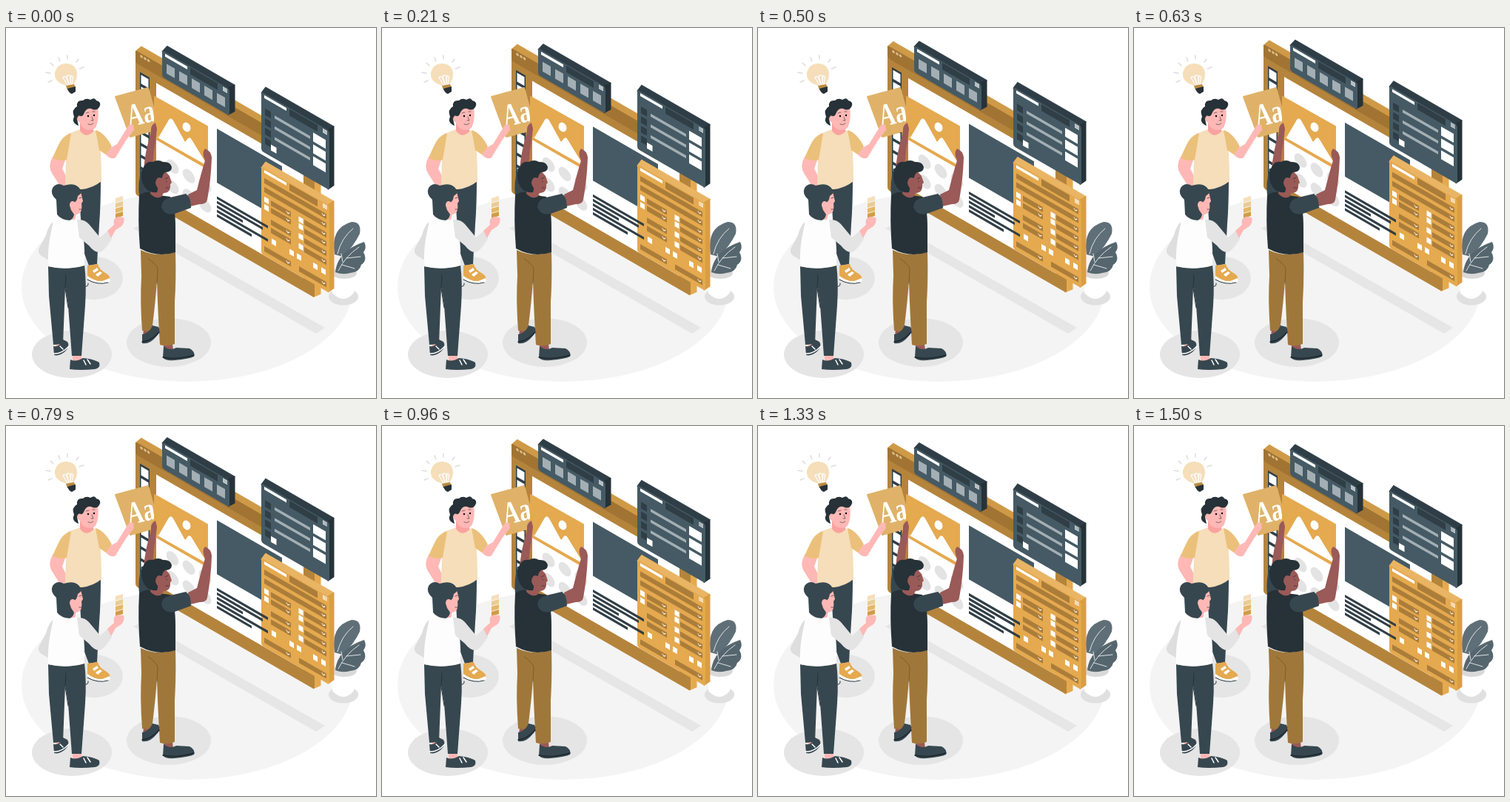
Write an HTML page that moves like this. It is 500 px wide and 500 px high and loops after 1.54 s.

```html
<!DOCTYPE html>
<html lang="en">
<meta charset="utf-8">
<title>Building a page together</title>
<style>
html, body { margin: 0; width: 100%; height: 100%; overflow: hidden; background: #fff }
svg { display: block; width: 100%; height: 100% }
.dark { fill: #263238 } .slate { fill: #37474f } .pink { fill: #ffb8b5 } .brown { fill: #9a5a57 }
.line { fill: none; stroke-linecap: round; stroke-linejoin: round }
</style>
<svg viewBox="0 0 500 500">
  <ellipse cx="245" cy="350" rx="224" ry="128" fill="#f4f4f4"/>
  <path d="M172 271L184 264 431 405 419 413Z" fill="#e6e6e6"/>
  <g fill="#e5e5e5">
    <ellipse cx="119" cy="338" rx="39" ry="29"/>
    <ellipse cx="220" cy="425" rx="57" ry="33"/>
    <ellipse cx="89" cy="441" rx="54" ry="32"/>
  </g>

  <g id="plant">
    <ellipse cx="456" cy="363" rx="20" ry="11.5" fill="#e0e0e0"/>
    <path d="M439 331L441 358Q456 374 470 358L474 331Z" fill="#fff"/>
    <ellipse cx="457" cy="331" rx="17" ry="8" fill="#d9d9d9"/>
    <path d="M444 306Q438 270 467 262Q481 262 478 278Q470 295 455 309Z" fill="#5f6f77"/>
    <path d="M445 330Q448 301 484 289Q488 297 483 303Q489 314 480 320Q478 330 465 331Q455 334 445 330Z" fill="#56666e"/>
    <path d="M448 305Q453 284 469 271M449 328Q459 308 477 296M455 316L453 305M460 311L479 309M454 320L471 325" class="line" stroke="#dfe4e6"/>
  </g>

  <g id="board"></g>

  <g id="bulb">
    <path d="M71 40L73 45M83 37V42M98 42L95 46M105 53L99 55M60 47L64 51M54 60L60 61M57 73L62 71" class="line" stroke="#ddd" stroke-width="1.5"/>
    <path d="M80 77Q65 73 66 61Q69 48 82 48Q95 49 96 62Q96 71 91 76L80 78Z" fill="#f5deb9"/>
    <path d="M83 77L77 67Q80 64 82 68L85 76 82 65Q86 62 87 67L87 76 88 64Q92 65 90 70L89 76" class="line" stroke="#fff" stroke-width="1.2"/>
    <path d="M81 78L92 76 94 81 83 84Z" fill="#b98a42"/>
    <path d="M83 82L94 79 94 86 89 89Q85 88 83 82Z" class="dark"/>
  </g>

  <g id="card">
    <path d="M148 93L192 81 207 136 168 147Z" fill="#e0b269" stroke="#e0b269" stroke-width="2" stroke-linejoin="round"/>
    <text transform="matrix(.7 -.17 .18 1 166 134)" font-family="'Liberation Serif',serif" font-weight="700" font-size="43" fill="#fff">Aa</text>
  </g>

  <g id="picture">
    <path d="M201 93L272 133V190L201 149Z" fill="#e5a94f" stroke="#e5a94f" stroke-width="2" stroke-linejoin="round"/>
    <path d="M206 148L220 124Q223 120 226 125L242 154 246 149Q249 147 251 151L270 182V185L203 147Z" fill="#fff"/>
    <ellipse cx="244" cy="134" rx="5.2" ry="6.6" transform="rotate(-25 244 134)" fill="#fff"/>
  </g>

  <g id="presenter">
    <path d="M63 174Q56 187 62 196L77 220 86 210 76 190 81 176Z" class="pink"/>
    <path d="M98 214L128 206Q128 240 126 265L123 319 112 321 104 300Z" class="slate"/>
    <path d="M110 321L124 319Q126 327 136 332Q143 337 139 343L122 345 110 337Z" fill="#e5a94f"/>
    <path d="M110 335Q121 343 130 342L140 338Q142 343 137 345Q124 348 110 339ZM117 328L123 324 125 327 119 331ZM121 333L127 329 130 331 124 336Z" fill="#fff"/>
    <path d="M110 340Q124 348 138 344M106 349Q112 350 111 345" class="line" stroke="#263238"/>
    <path d="M84 143L100 137 118 138 126 141Q129 175 129 207Q118 216 103 218L80 217Q80 180 84 143Z" fill="#f5deb9"/>
    <path d="M88 142Q76 145 70 160L63 175Q72 181 82 178Z" fill="#ebc07a"/>
    <path d="M141 162L150 157 163 136Q166 129 172 131L173 138Q168 144 162 152L148 175Q142 179 134 170Z" class="pink"/>
    <path d="M121 138Q133 141 143 160L135 171 126 165Z" fill="#ebc07a"/>
    <path d="M100 128V139Q108 150 118 140V130Z" fill="#f9a3a0"/>
    <path d="M99 112Q101 105 111 106L124 107Q126 120 123 130Q121 138 113 138Q102 137 100 128Q94 124 97 119Z" class="pink"/>
    <path d="M98 132Q88 128 92 120Q88 110 96 106Q95 97 104 98Q108 94 114 97Q120 93 122 98Q130 100 126 107Q122 113 115 109Q109 108 106 114Q104 120 101 119Q97 117 96 123Z" class="dark"/>
    <circle cx="111" cy="119" r="1.2"/><circle cx="119" cy="118" r="1.2"/>
    <path d="M108 115L112 114M117 113L120 113M116 120L118 125 115 125M111 130Q115 132 118 129" class="line" stroke="#263238" stroke-width=".6"/>
  </g>

  <g id="holder">
    <path d="M186 192Q188 165 196 142Q195 130 202 128L204 136Q203 150 200 166L198 190Z" class="brown"/>
    <path d="M180 226Q178 210 183 190L197 188 196 222Z" class="slate"/>
    <path d="M186 405H196V415L185 419ZM213 427H225L226 436 213 437Z" class="brown"/>
    <path d="M182 300Q205 311 229 302Q230 340 228 370V427Q217 431 208 428Q205 380 204 342Q202 370 197 410L184 409Q181 370 183 335Z" fill="#a0773a"/>
    <path d="M192 312Q202 318 205 325L204 345" class="line" stroke="#7d5c2b"/>
    <path d="M184 414Q194 412 198 402L206 404Q210 410 203 417Q194 428 184 426ZM213 430Q222 437 230 432L248 433Q256 437 254 444Q248 447 228 449Q214 450 212 445Z" class="slate"/>
    <path d="M212 445Q230 449 254 442M184 424Q195 424 207 411" class="line" stroke="#1d272c" stroke-width="1.5"/>
    <path d="M180 226Q192 217 207 226L222 228Q229 240 229 270V303Q205 311 181 298Q178 260 180 226Z" class="dark"/>
    <path d="M246 225L258 219Q264 195 269 179Q264 168 269 163Q277 166 278 175Q277 205 272 232Q271 238 262 238L249 241Z" class="brown"/>
    <path d="M210 242Q210 232 222 229L243 224Q250 228 250 243L228 251Q214 254 210 242Z" class="slate"/>
    <path d="M196 204L214 192 221 200 224 209 222 211Q223 223 213 223L210 228Q203 232 195 224Z" class="brown"/>
    <path d="M184 208Q181 196 186 188Q190 179 198 181Q206 177 212 181Q222 180 224 188Q224 195 215 195Q211 198 211 203Q203 199 202 210Q207 216 204 222Q190 224 184 208Z" class="dark"/>
    <ellipse cx="206" cy="210" rx="3.6" ry="5.5" class="brown"/>
    <path d="M215 204L219 202M217 207V208M216 216L220 216" class="line" stroke="#263238" stroke-width=".7"/>
  </g>

  <g id="chooser">
    <path d="M63 262Q57 268 54 280L44 299Q43 305 48 308L58 314 63 290Z" fill="#dedede"/>
    <path d="M67 419H77V430L68 434ZM90 440H102V452H90Z" class="pink"/>
    <path d="M57 322Q82 328 106 320Q109 345 107 375L102 443H89L84 375 80 350 77 427 64 428 58 362Z" class="slate"/>
    <path d="M81 334L80 352 84 378" class="line" stroke="#263238"/>
    <path d="M64 430Q72 432 77 421L83 424Q87 430 80 437Q72 444 65 442ZM87 448Q94 452 104 446L112 447Q121 449 126 452Q128 460 120 461Q100 463 86 461Z" class="slate"/>
    <path d="M64 440Q75 441 85 430M105 449L108 455M110 448L114 454M73 430L77 434" class="line" stroke="#fff" stroke-width="1.5"/>
    <path d="M64 261Q76 255 96 258Q103 262 104 275Q107 300 106 321Q82 328 57 322Q56 300 60 280Z" fill="#fdfdfd"/>
    <path d="M96 259Q106 258 112 265L127 283 138 274 143 285Q134 300 127 303Q120 304 112 294L99 283Z" fill="#e4e4e4"/>
    <g id="swatch"></g>
    <path d="M137 274L146 266Q144 257 151 255L159 256Q161 262 156 268L148 273 142 284Z" class="pink"/>
    <path d="M97 223L101 221 104 234 102 237Q104 251 95 252L93 259H82Q83 244 88 234Z" class="pink"/>
    <path d="M68 232Q59 224 63 216Q69 208 78 213Q98 207 102 223L97 227Q96 236 90 236Q85 240 88 246L92 252Q91 258 86 260Q74 259 69 252Z" class="slate"/>
    <ellipse cx="90" cy="239" rx="4" ry="5" class="pink"/>
    <path d="M99 230L102 229M99 245H102" class="line" stroke="#263238" stroke-width=".7"/>
  </g>
</svg>
<script>
const LOOP = 1540, HEAD_START = 40, LIFT = 10, SLOPE = .577;
const slate = '#455a64', ink = '#303e46', gold = '#e5a94f', ochre = '#b5843c', umber = '#ab7d3a';
const el = id => document.getElementById(id);
const rect = (x, y, w, h, fill, r = 0) =>
  `<rect x="${x}" y="${y}" width="${w}" height="${h}" rx="${r}" fill="${fill}"/>`;
const each = (list, draw) => list.map(draw).join('');
const plane = (x, y, content) => `<g transform="matrix(1 ${SLOPE} 0 1 ${x} ${y})">${content}</g>`;

// A slab facing the viewer, with its top and right sides showing.
const slab = (x, y, w, h, d, [front, top, side], content) => plane(x, y, `
  <path d="M0 2L${d} -9.5H${w + d}L${w} 2Z" fill="${top}" stroke="${top}" stroke-linejoin="round"/>
  <path d="M${w - 2} 0L${w + d} -9.5V${h - 10}L${w - 2} ${h}Z" fill="${side}" stroke="${side}" stroke-linejoin="round"/>
  ${rect(0, 0, w, h, front, 3)}${content}`);

const header = (w, shade) => rect(4, 2.5, 30, 4, '#fff') + rect(38, 1.5, w - 54, 9, shade) +
  each([0, 2, 4], i => rect(w - 9, 2 + i, 6, 1.2, '#fff'));

const page = rect(0, 0, 242, 17, '#a17434', 3) +
  each([8, 13, 17.5], x => `<circle cx="${x}" cy="4" r="1.8" fill="#e0c08a"/>`) +
  rect(6, 26, 13, 148, ink) +
  each([...Array(9).keys()], i => rect(7.5, 29 + 16 * i, 10, 12, '#fff')) +
  rect(28, 28, 199, 149, '#fff') +
  each([50, 72, 94], x => each([128.5, 155.5], y => `<circle cx="${x}" cy="${y}" r="8.4" fill="#e3e3e3"/>`)) +
  rect(110, 42.5, 88, 73, slate);

const gallery = header(91, ink) + each([0, 1, 2, 3, 4], i => rect(6 + 17 * i, 15, 11, 13, '#a3afb4'));

const list = header(92, ink) +
  each([20, 33, 46, 59], y => rect(5, y, 8, 9, ink)) +
  each([22, 36.5, 51], y => rect(18, y, 48, 4, '#a3afb4')) +
  each([15, 31, 47], y => rect(70, y, 17, 12, '#fff')) + rect(13, 64, 7.5, 8, '#fff');

const field = (x, y, w) => rect(x, y - 3.5, w, 7, umber) +
  `<path d="M${x + w - 6} ${y - 1}l2 2 2-2" class="line" stroke="#fff"/>`;
const box = (x, y) => rect(x - 3, y - 3.5, 6, 7, '#fff');
const form = header(92, umber) + field(4, 17, 84) + field(4, 29, 84) +
  each([42, 52, 68, 79], y => field(13, y, 27)) +
  each([42, 54, 67, 79], y => field(58, y, 30)) +
  each([42, 52], y => box(7, y)) + each([42, 51, 64.5, 78], y => box(53.5, y)) +
  each([17, 41, 51, 73, 84], x => box(x, 93)) +
  field(4, 109, 36) + field(51, 109, 37);

const lines = each([69, 62, 35, 69, 47], (w, i) => rect(110, 134 + 6 * i, w, 3.6, ink));

const cool = [slate, '#2f3e46', '#263238'];
el('board').innerHTML =
  slab(175, 30.5, 242, 195, 8, [ochre, '#cf9a48', gold], page) +
  slab(211, 30.5, 91, 36, 7, cool, gallery) +
  slab(345, 86.5, 92, 80, 6, cool, list) +
  slab(345, 187.5, 92, 118, 6, [gold, '#e9b565', '#d99d45'], form) +
  plane(175, 30.5, lines);

el('swatch').innerHTML = each(['#f5deb9', '#eccb92', '#e7b668', '#d39b48'], (c, i) =>
  `<path d="M148 ${230 + 7 * i}l10-3v6l-10 3z" fill="${c}"/>`);

// The board rises and sinks at constant speed.
function frame(now) {
  const phase = (now + HEAD_START) / LOOP % 1;
  const y = -LIFT * (1 - Math.abs(1 - 2 * phase));
  el('board').setAttribute('transform', `translate(0 ${y.toFixed(2)})`);
  requestAnimationFrame(frame);
}
frame(performance.now());
</script>
</html>
```
